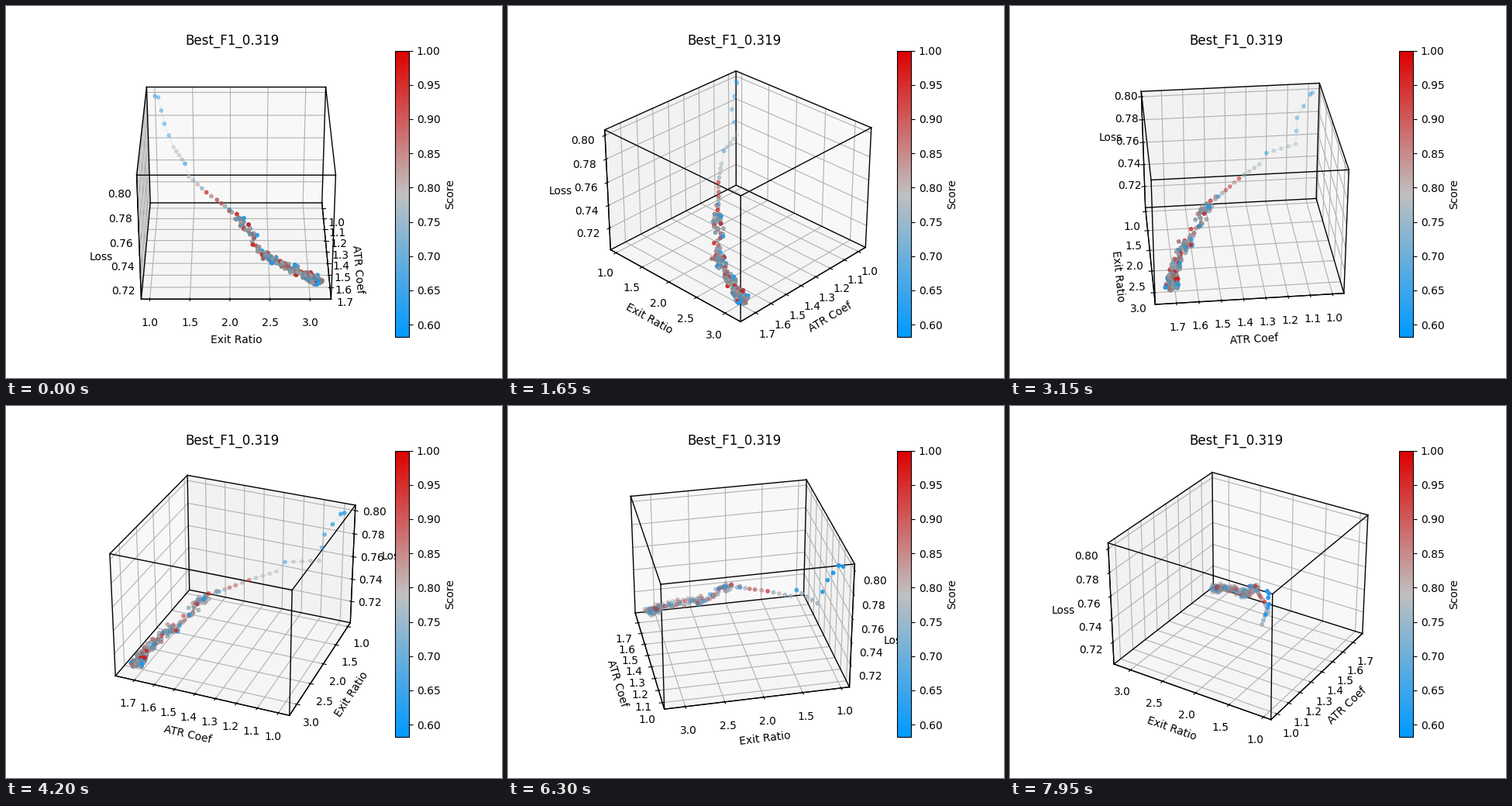
A matplotlib script for the animation above (8000 ms loop, 640 by 480 pixels).

```python
import itertools

import matplotlib.pyplot as plt
import numpy as np
from matplotlib.animation import FuncAnimation
from matplotlib.colors import LinearSegmentedColormap, Normalize
from matplotlib.ticker import MultipleLocator

STEP_MS, TICK_MS, LOOP_MS = 150, 50, 8000
DEG_PER_STEP = 4
LIMITS = np.array([[0.948, 1.795], [0.892, 3.264], [0.7004, 0.8046]])
CUBE = np.array([1.1905, 1.1905, 0.8929])  # box size of the 4:4:3 axes

CMAP = LinearSegmentedColormap.from_list(
    "score", ["#0099ff", "#c0c0c0", "#dd0000"])
NORM = Normalize(0.5818, 1.0)

# run number, then ATR, exit and loss in cube units from the centre
KEYS = np.array([
    (0, -.542, -.539, .406),
    (1, -.523, -.516, .406),
    (3, -.431, -.475, .257),
    (5, -.418, -.418, .089),
    (9, -.210, -.335, .078),
    (10, -.161, -.310, .009),
    (14, -.013, -.193, -.025),
    (17, .090, -.095, -.052),
    (22, .195, .000, -.076),
    (40, .260, .060, -.120),
    (52, .285, .130, -.190),
    (60, .350, .160, -.262),
    (82, .385, .210, -.272),
    (100, .430, .320, -.310),
    (130, .475, .455, -.350),
    (215, .490, .515, -.385),
])
JITTER = (.020, .022, .012)


def make_points():
    rng = np.random.default_rng(7)
    run = np.arange(KEYS[-1, 0] + 1)
    place = np.column_stack([np.interp(run, KEYS[:, 0], k) for k in KEYS.T[1:]])
    noise = rng.normal(size=place.shape).clip(-1.8, 1.8) * JITTER
    place += noise * np.interp(run, [15, 24], [0, 1])[:, None]
    place = place.clip(-CUBE / 2.2, CUBE / 2.2)

    spread = np.interp(run, [5, 9, 18], [.01, .02, .10])
    score = rng.normal(0.76, spread).clip(0.60, 0.94)
    blue = (run < 5) | (run % 10 == 9)
    red = (run > 5) & (run % 10 == 4)
    score[blue], score[red] = 0.60, 0.98
    muted = np.where(blue | red, 0, np.interp(run, [12, 22], [0, 1]))

    center = LIMITS.mean(axis=1)
    return center + place * np.ptp(LIMITS, axis=1) / CUBE, score, muted


def toward_gray(colors, amount):
    mixed = colors.copy()
    mixed[:, :3] += (0.5 - mixed[:, :3]) * np.reshape(amount, (-1, 1))
    return mixed


def draw_box(ax):
    corners = itertools.product(*LIMITS)
    for a, b in itertools.combinations(map(np.array, corners), 2):
        if np.count_nonzero(a != b) == 1:
            ax.plot(*zip(a, b), color="black", lw=1)


place, score, muted = make_points()
colors = CMAP(NORM(score))

fig = plt.figure(figsize=(6.4, 4.8), dpi=100)
ax = fig.add_subplot(projection="3d")
draw_box(ax)
ax.plot(*place.T, color="0.5", alpha=0.15, lw=0.8)
ax.scatter(*place.T, s=10, c=toward_gray(colors, 0.1 + 0.25 * muted),
           edgecolors=toward_gray(colors, 0.15 + 0.6 * muted))
ax.set(xlim=LIMITS[0], ylim=LIMITS[1], zlim=LIMITS[2],
       xlabel="ATR Coef", ylabel="Exit Ratio", zlabel="Loss")
for axis, spacing in zip((ax.xaxis, ax.yaxis, ax.zaxis), (0.1, 0.5, 0.02)):
    axis.set_major_locator(MultipleLocator(spacing))
ax.set_title("Best_F1_0.319")
fig.colorbar(plt.cm.ScalarMappable(NORM, CMAP), ax=ax, label="Score",
             ticks=np.arange(0.6, 1.01, 0.05))


def update(tick):
    step = tick * TICK_MS // STEP_MS
    # the tiny offset keeps the walls well defined in edge-on views
    ax.view_init(elev=30, azim=step * DEG_PER_STEP + 0.001)
    return []


anim = FuncAnimation(fig, update, frames=LOOP_MS // TICK_MS,
                     interval=TICK_MS, repeat=True, repeat_delay=0)
plt.show()
```
